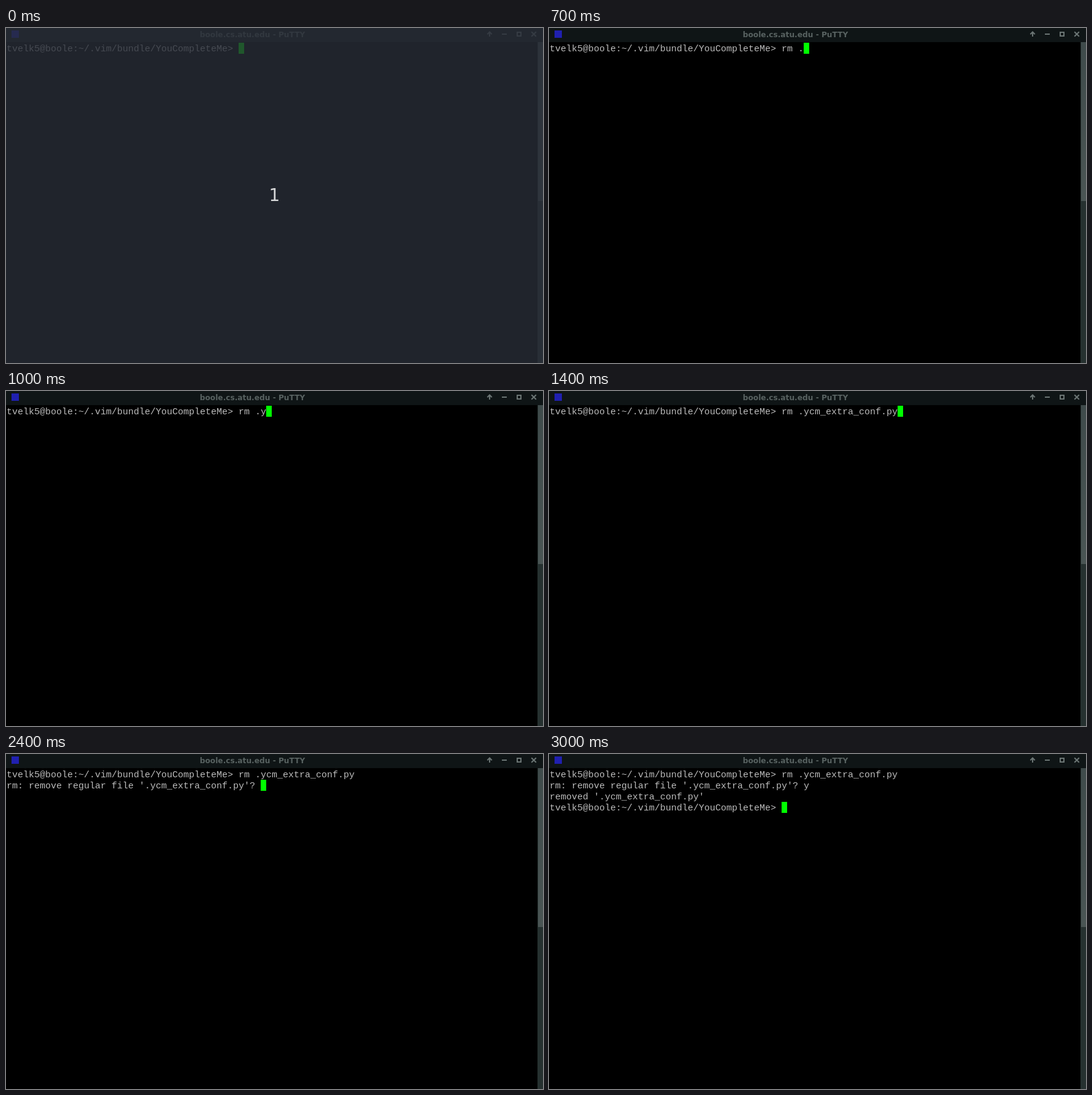
Write an HTML page that moves like this. It is 875 px wide and 546 px high and loops after 3900 ms.

```html
<!DOCTYPE html>
<html lang="en">
<head>
<meta charset="utf-8">
<title>Terminal</title>
<style>
  html, body { margin: 0; width: 100%; height: 100%; overflow: hidden; background: #000; }
  svg { display: block; width: 875px; height: 546px; }
  .line { font: 15px "Liberation Mono", monospace; fill: #bbb; white-space: pre; }
  .title { font: bold 12.2px "DejaVu Sans", sans-serif; fill: #586261; text-anchor: middle; }
  .count { font: 28px "DejaVu Sans", sans-serif; fill: #d6d7d8; text-anchor: middle; }
  .buttons { fill: none; stroke: #6b7574; stroke-width: 2; }
</style>
</head>
<body>
<svg viewBox="0 0 875 546">
  <defs>
    <linearGradient id="thumb" x2="0" y2="1">
      <stop offset="0" stop-color="#3f4b4b"/>
      <stop offset="1" stop-color="#4a5554"/>
    </linearGradient>
  </defs>
  <rect width="875" height="546"/>
  <rect width="875" height="23" fill="#0f1516"/>
  <rect x="9" y="4" width="12" height="12" fill="#2020b0"/>
  <text class="title" x="401.5" y="15">boole.cs.atu.edu - PuTTY</text>
  <g class="buttons">
    <path d="M788 14V7M784.3 10.2L788 6.5L791.7 10.2"/>
    <path d="M808 10H816"/>
    <path d="M833 7H839V13H833Z"/>
    <path d="M856.2 6.2L863.8 13.8M863.8 6.2L856.2 13.8"/>
  </g>
  <rect x="866" y="23" width="9" height="523" fill="#263130"/>
  <rect x="867" y="23" width="8" height="259" fill="url(#thumb)"/>
  <g id="screen"></g>
  <g id="veil">
    <rect width="875" height="546" fill="#292e37" opacity=".8"/>
    <text class="count" x="437.5" y="282">1</text>
  </g>
</svg>
<script>
const LOOP = 3900, CELL_W = 9, CELL_H = 18, LEFT = 1, TOP = 24;
const PROMPT = "tvelk5@boole:~/.vim/bundle/YouCompleteMe> ";
const FILE = ".ycm_extra_conf.py";
const COMMAND = PROMPT + "rm " + FILE;
const QUESTION = `rm: remove regular file '${FILE}'? `;

// [start in ms, lines on screen]; the cursor follows the last line
const steps = [
  [0, [PROMPT]],
  [400, [PROMPT + "r"]],
  [500, [PROMPT + "rm"]],
  [700, [PROMPT + "rm ."]],
  [1000, [PROMPT + "rm .y"]],
  [1200, [PROMPT + "rm .ycm"]],
  [1400, [COMMAND]],
  [2400, [COMMAND, QUESTION]],
  [2700, [COMMAND, QUESTION + "y"]],
  [3000, [COMMAND, QUESTION + "y", `removed '${FILE}'`, PROMPT]]
];

const screen = document.getElementById("screen");
const veil = document.getElementById("veil");

function add(tag, attrs, text = "") {
  const node = document.createElementNS("http://www.w3.org/2000/svg", tag);
  for (const key in attrs) node.setAttribute(key, attrs[key]);
  node.textContent = text;
  screen.append(node);
}

function draw(lines) {
  screen.replaceChildren();
  lines.forEach((line, row) =>
    add("text", { class: "line", x: LEFT, y: TOP + 14 + row * CELL_H }, line));
  const row = lines.length - 1;
  add("rect", {
    x: LEFT + lines[row].length * CELL_W, y: TOP + row * CELL_H,
    width: CELL_W, height: CELL_H, fill: "#0f0"
  });
}

let shown;
function tick() {
  const time = performance.now() % LOOP;
  const step = steps.findLast(([start]) => start <= time);
  if (step !== shown) {
    shown = step;
    draw(step[1]);
    veil.style.display = step === steps[0] ? "" : "none";
  }
  requestAnimationFrame(tick);
}
tick();
</script>
</body>
</html>
```
